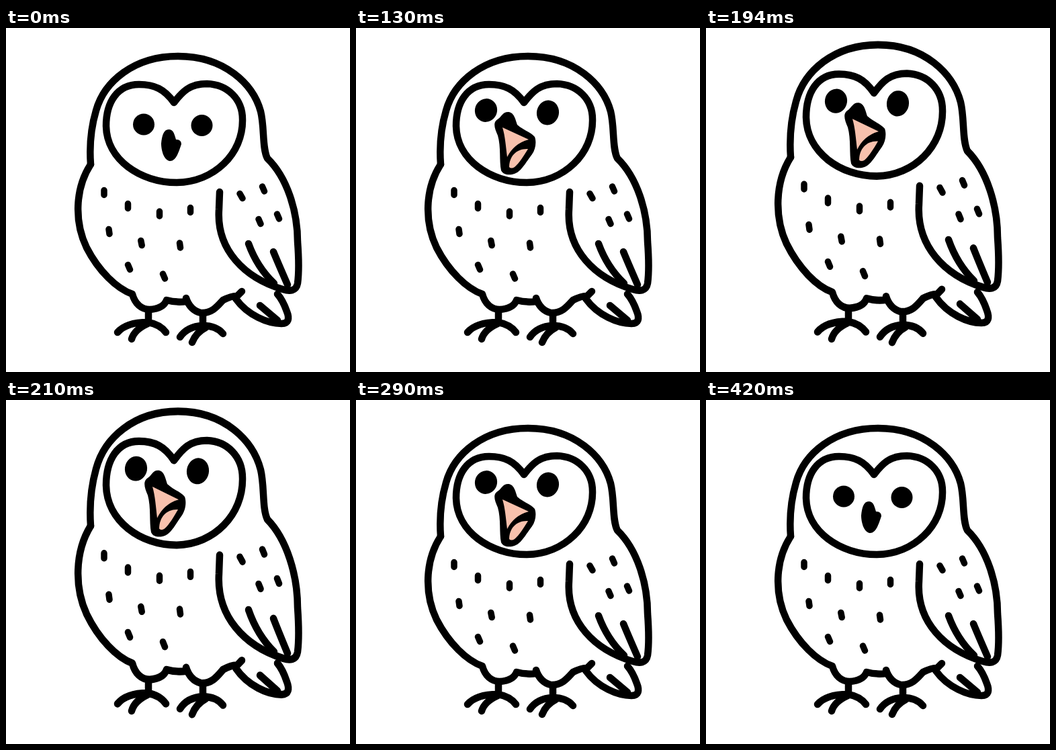
These frames come from a looping animation (512 by 512 pixels, 0.46 s). An HTML page:

```html
<!DOCTYPE html>
<html lang="en">
<head>
<meta charset="utf-8">
<title>Hooting owl</title>
<style>
  html, body { margin: 0; height: 100%; overflow: hidden; background: #fff; }
  svg { display: block; width: 100vw; height: 100vh; }
  .line { fill: none; stroke: #000; stroke-width: 10.5; stroke-linecap: round; stroke-linejoin: round; }
  .pink { fill: #f8c1ad; }
</style>
</head>
<body>
<svg viewBox="0 0 512 512">
  <g id="owl">
    <g class="line">
      <!-- head, back and wing -->
      <path d="M126 203C124 176 126 150 134 123C146 80 190 42 256 42C326 42 368 84 379 124C385 148 381 178 389 194
               C418 222 434 272 434 318C436 345 436 365 434 380C432 392 422 392 412 389C355 372 313 330 317 270L318 244"/>
      <path d="M361 321C369 343 380 362 399 380M398 333C405 350 412 366 419 382"/>
      <!-- chest and belly -->
      <path d="M126 203C102 240 102 290 120 327C138 362 165 388 188 396C192 411 202 419 214 419C228 418 236 413 239 405
               Q254 409 268 407V402Q274 420 290 424C306 425 314 415 323 405Q337 398 344 399L351 392"/>
      <!-- tail -->
      <path d="M342 403C360 428 390 440 410 440C421 440 422 432 418 422Q412 405 404 396M378 413L404 435"/>
      <!-- face -->
      <path d="M250 111C236 91 221 84 198 84C166 84 149 110 149 146C150 196 200 230 254 230C310 229 353 187 352 136
               C352 106 330 84 299 83C274 83 263 94 250 111Z"/>
      <!-- legs -->
      <path d="M212 420V437M166 453Q179 438 211 438Q229 441 238 453M187 463Q191 449 211 440
               M293 428V443M259 460Q270 444 293 443Q313 443 323 455M277 468Q283 453 297 446"/>
      <path id="spots" stroke-width="9.5" style="stroke-width:9.5"/>
    </g>
    <g id="shut">
      <circle cx="205" cy="143.500" r="16"/>
      <circle cx="291.500" cy="145" r="16"/>
      <path d="M242 151C249 150 251 159 253 166Q261 166 261 173C258 181 254 198 244 198C235 197 231 182 231 172C232 160 235 151 242 151Z"/>
    </g>
    <g id="open">
      <ellipse cx="193.500" cy="122.500" rx="16.500" ry="17.500" transform="rotate(20 193.500 122.500)"/>
      <ellipse cx="285.500" cy="126" rx="16.500" ry="18.500" transform="rotate(12 285.500 126)"/>
      <path d="M226 125C235 125 237 135 240 144C249 152 260 155 266 162C269 170 267 181 262 188C254 198 247 212 238 216
               C230 220 219 219 216 212C213 198 216 177 211 160C206 149 203 140 212 135C217 131 219 125 226 125Z"/>
      <path class="pink" d="M218 148L257 166Q235 172 225 192C223 176 222 161 218 148Z"/>
      <path class="pink" d="M228 207C228 190 240 179 256 180C250 190 243 201 236 207Q231 210 228 207Z"/>
    </g>
  </g>
</svg>
<script>
  const $ = id => document.getElementById(id);
  const GROUND = 468, LOOP = 460;

  // Spots on chest and wing: centre x, centre y, half tilt
  $('spots').setAttribute('d', [
    [146, 245, 0], [181.5, 265, 0], [228.5, 276.5, 0], [274.5, 271, 0],
    [153.5, 303, .5], [201.5, 320, .7], [259, 323.5, .5], [183, 356, 1.5], [235, 369.5, 1.5],
    [350, 250, 2], [383, 239.5, 1.5], [377.5, 288, 1.5], [405, 280.5, 1.5]
  ].map(([x, y, s]) => `M${x - s} ${y - 3.5}L${x + s} ${y + 3.5}`).join(''));

  // Start time, stretch and open beak of each pose
  const poses = [[0, 1, 0], [130, 1, 1], [170, 1.04, 1], [210, 1.059, 1], [250, 1.04, 1], [290, 1, 1], [420, 1, 0]];

  function draw(now) {
    const t = now % LOOP;
    const [, stretch, hoot] = poses.findLast(p => p[0] <= t);
    $('owl').setAttribute('transform', `translate(0 ${GROUND * (1 - stretch)}) scale(1 ${stretch})`);
    $('open').style.display = hoot ? '' : 'none';
    $('shut').style.display = hoot ? 'none' : '';
  }

  function tick() {
    draw(performance.now());
    requestAnimationFrame(tick);
  }
  tick();
</script>
</body>
</html>
```
